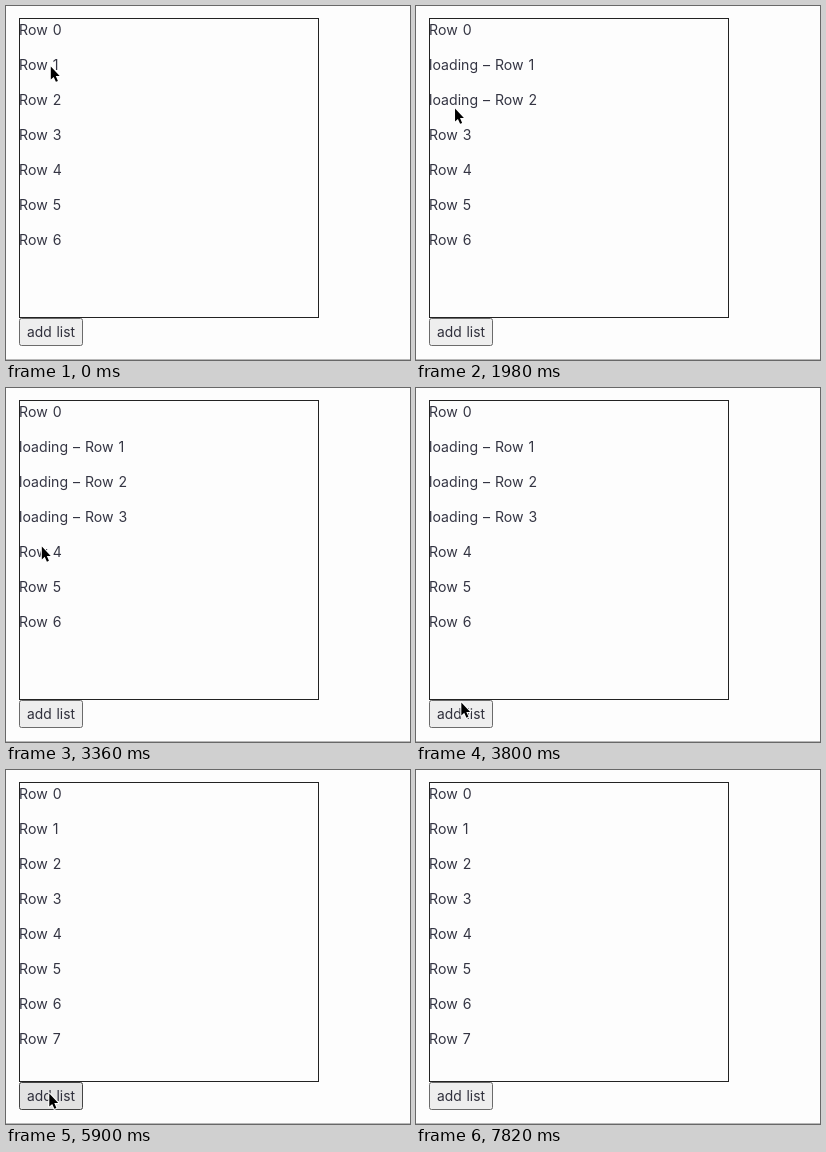
An HTML page for the animation above (8 s loop, 404 by 354 pixels).

```html
<!DOCTYPE html>
<html lang="en">
<head>
<meta charset="utf-8">
<title>Row list</title>
<style>
  html, body { margin: 0; width: 100%; height: 100%; overflow: hidden; background: #fdfdfd; }
  svg { display: block; }
  text { font: 14.1px Inter, "Liberation Sans", sans-serif; word-spacing: 1px; fill: #343543; }
  .label { font-size: 13.8px; fill: #2f2f3b; text-anchor: middle; }
</style>
</head>
<body>
<svg width="404" height="354" viewBox="0 0 404 354">
  <rect width="404" height="354" fill="#fdfdfd"/>
  <rect x="13.5" y="12.5" width="299" height="299" fill="none" stroke="#222"/>
  <g id="rows"></g>
  <rect id="button" x="13.5" y="312.5" width="63" height="27" rx="2"/>
  <text class="label" x="45" y="331">add list</text>
  <rect y="353" width="404" height="1" fill="#b8b8b8"/>
  <circle id="ring" r="20" fill="none" stroke="#000" stroke-width="3"/>
  <path id="cursor" d="M.3 .5V13.6L3.2 10.9L5.4 15.8L7.4 14.9L5.3 10H9.2Z"
        fill="#000" stroke="#fff" stroke-width="2" stroke-linejoin="round" paint-order="stroke"/>
</svg>
<script>
const DURATION = 8000;
const ROW_COUNT = 8;
const ROW_STEP = 35;
const REACTION = 60; // delay between releasing the pointer and the list changing

const START = { x: 44.5, y: 60 };
const GLIDES = [
  { from: 200, to: 960, x: 42.5, y: 84 },     // second row
  { from: 1660, to: 2380, x: 33.5, y: 127 },  // third row
  { from: 2840, to: 3240, x: 34.5, y: 141 },
  { from: 3240, to: 3880, x: 45.5, y: 321.5 },
  { from: 4300, to: 4600, x: 43, y: 323 },    // button
  { from: 6580, to: 7000, x: 45, y: 333 },
  { from: 7260, to: 7820, x: 47, y: 358 }     // off stage
];

const ROW_CLICKS = [
  { row: 1, down: -300, up: 0 },
  { row: 2, down: 1100, up: 1420 },
  { row: 3, down: 2500, up: 2780 }
];
const ADD_CLICK = { down: 4600, up: 4780 };

const byId = id => document.getElementById(id);
const button = byId("button"), ring = byId("ring"), cursor = byId("cursor");

const rows = Array.from({ length: ROW_COUNT }, (_, i) => {
  const row = document.createElementNS("http://www.w3.org/2000/svg", "text");
  row.setAttribute("x", 13.1);
  row.setAttribute("y", 29 + ROW_STEP * i);
  return byId("rows").appendChild(row);
});

function progress(t, from, to) {
  const u = Math.min(1, Math.max(0, (t - from) / (to - from)));
  return u * u * (3 - 2 * u);
}

function pointerAt(t) {
  return GLIDES.reduce((p, glide) => {
    const u = progress(t, glide.from, glide.to);
    return { x: p.x + (glide.x - p.x) * u, y: p.y + (glide.y - p.y) * u };
  }, START);
}

const isDown = (click, t) => t >= click.down && t < click.up;
const isDone = (click, t) => t >= click.up + REACTION;

function rowText(i, t) {
  if (isDone(ADD_CLICK, t)) return `Row ${i}`;
  if (i === ROW_COUNT - 1) return "";
  const loading = ROW_CLICKS.some(click => click.row === i && isDone(click, t));
  return `${loading ? "loading – " : ""}Row ${i}`;
}

function buttonColors(t, y) {
  if (t >= ADD_CLICK.down && !isDone(ADD_CLICK, t)) return ["#f4f4f4", "#777"];
  const hovered = y > 315 && y < 340;
  return hovered ? ["#e2e2e2", "#444"] : ["#eeeeee", "#6b6b6b"];
}

function render(t) {
  rows.forEach((row, i) => {
    const text = rowText(i, t);
    if (row.textContent !== text) row.textContent = text;
  });

  const { x, y } = pointerAt(t);
  cursor.setAttribute("transform", `translate(${x} ${y})`);
  ring.setAttribute("transform", `translate(${x} ${y + 0.5})`);
  const pressed = [...ROW_CLICKS, ADD_CLICK].some(click => isDown(click, t));
  ring.setAttribute("visibility", pressed ? "visible" : "hidden");

  const [fill, stroke] = buttonColors(t, y);
  button.setAttribute("fill", fill);
  button.setAttribute("stroke", stroke);
}

const start = performance.now();
function frame() {
  render((performance.now() - start) % DURATION);
  requestAnimationFrame(frame);
}
render(0);
requestAnimationFrame(frame);
</script>
</body>
</html>
```
